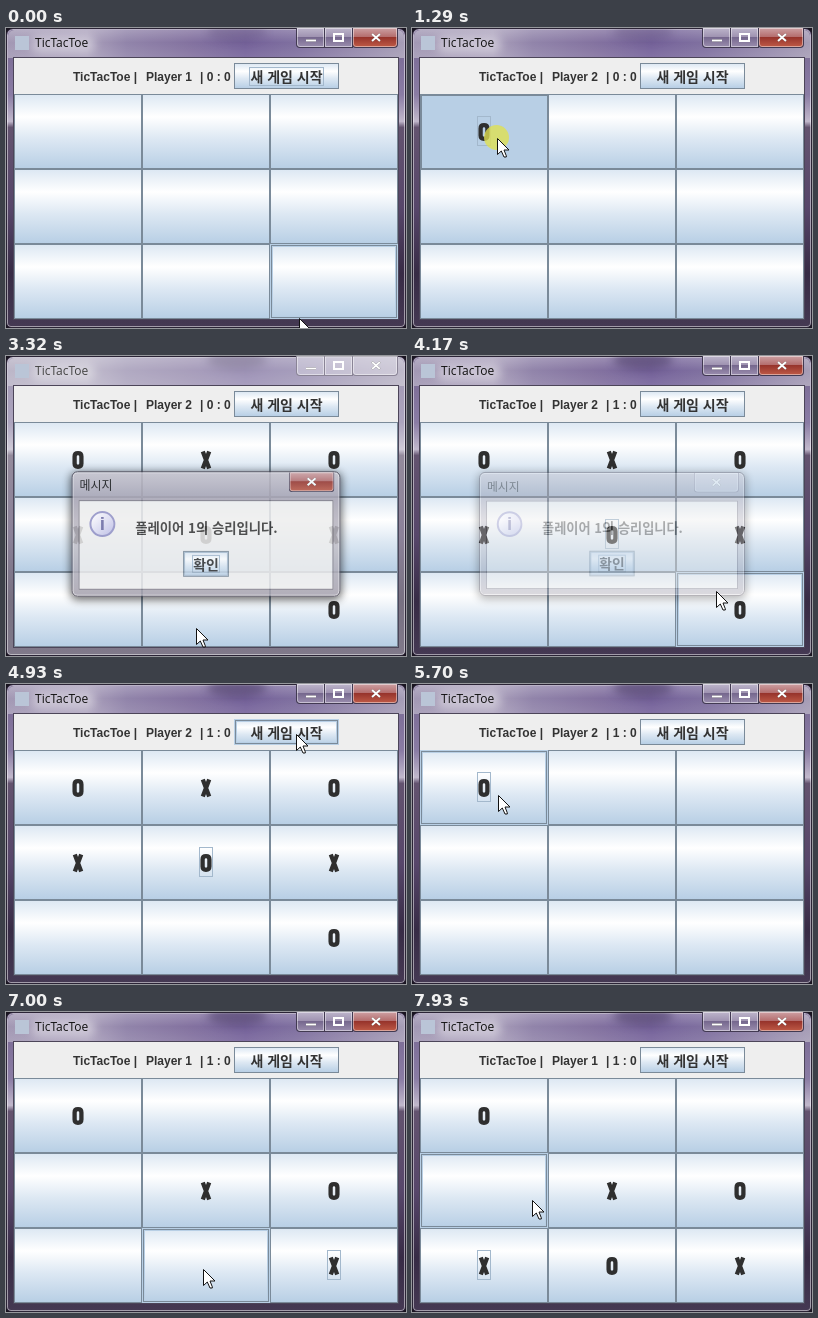
These frames come from a looping animation (400 by 300 pixels, 8 s). An HTML page:

```html
<!DOCTYPE html>
<html lang="ko">
<head>
<meta charset="utf-8">
<title>TicTacToe</title>
<style>
html, body { margin: 0; width: 100%; height: 100%; overflow: hidden; background: #18131f; }
body * { position: absolute; box-sizing: border-box; }
#stage { left: 0; top: 0; width: 400px; height: 300px; overflow: hidden; color: #333; }

/* glass frame */
#frame {
  inset: 0; border-radius: 7px 7px 5px 5px; border: 1px solid #2b2436; overflow: hidden;
  background: linear-gradient(#75658f, #8a7ca4 22%, #c1b8cc 31%, #63536f 33%, #57466a 60%, #372b45 82%, #453953);
  box-shadow: inset 0 0 0 1px rgba(255,255,255,.5);
}
#sky {
  left: 1px; top: 1px; width: 396px; height: 28px; border-radius: 6px 6px 0 0;
  background: linear-gradient(rgba(255,255,255,.2), rgba(255,255,255,0) 45%, rgba(255,255,255,.1)),
    linear-gradient(90deg, #a298b4, #aaa0bb 20%, #9184aa 30%, #8473a0 45%, #75629a 60%, #8071a0 74%, #a69db6);
}
#tree { left: 200px; top: -6px; width: 60px; height: 18px; border-radius: 50%; background: #4f406b; filter: blur(4px); opacity: .25; }
.late #tree { opacity: .6; }
#glow { left: 24px; top: 7px; width: 64px; height: 17px; border-radius: 8px; background: #fff; opacity: .4; filter: blur(5px); }
#icon { left: 9px; top: 8px; width: 14px; height: 14px; background: #bac5d7; }
.title { font: 12px/16px "Open Sans", "Noto Sans CJK KR", "Noto Sans CJK", sans-serif; color: #111; white-space: nowrap; }
.idle #frame::after { content: ""; position: absolute; inset: 0; background: rgba(232,234,236,.36); }
.idle > .title { color: #444; }

.cap { top: 0; height: 20px; border: 1px solid #423a52; border-top: 0;
  background: linear-gradient(#bdb5cb, #a094b2 45%, #76688e 50%, #9a8dae); box-shadow: inset 0 0 0 1px rgba(255,255,255,.45); }
.close { border-radius: 0 0 4px 4px; background: linear-gradient(#cda0a3, #b56f6f 45%, #97342c 50%, #bf5a46); }
.idle > .cap, .closing .close { background: rgba(225,222,232,.45); border-color: #8a8496; }
.cap svg { left: 0; top: 0; width: 100%; height: 100%; overflow: visible; }
.cap path, .cap rect { fill: none; stroke: #fff; stroke-width: 2; filter: drop-shadow(0 0 .6px #333); }

/* client area */
#client { left: 7px; top: 29px; width: 386px; height: 263px; background: #eee; border: 1px solid #4c4559; }
#board { left: 0; top: 0; }
.label { top: 41px; font: bold 12px/16px "Liberation Sans", Arial, sans-serif; white-space: nowrap; }
.btn {
  border: 1px solid #7a8a99;
  background: linear-gradient(#dde8f3, #fff 30%, #dde8f3 60%, #b8cfe5);
}
.hover { border-color: #b8cfe5; box-shadow: inset 0 0 0 1px #7a8a99, inset 0 0 0 2px #b8cfe5; }
.down { background: #b8cfe5; border-color: #7a8a99; box-shadow: inset 1px 1px #7a8a99; }
.cell { width: 128px; height: 75px; }
.cell svg { left: 57px; top: 28px; width: 12px; height: 18px; overflow: visible; }
.cell path { fill: none; stroke: #2f2f2f; stroke-width: 4.3; display: none; }
.o .ring, .x .cross { display: inline; }
.focus { border: 1px solid #a3b8cc; visibility: hidden; }
.on > .focus { visibility: visible; }
.cell .focus { left: 56px; top: 21px; width: 14px; height: 30px; }
.ko { font: bold 14px/18px "Noto Sans CJK KR", "Noto Sans CJK", "Noto Sans", sans-serif; white-space: nowrap; }
.mid { left: 0; right: 0; text-align: center; }
#fresh { left: 228px; top: 35px; width: 105px; height: 26px; }
#fresh .focus { left: 14px; top: 3px; width: 75px; height: 19px; }

/* message box */
#box {
  left: 65px; top: 115px; width: 270px; height: 126px; border-radius: 6px; border: 1px solid #3c3846;
  background: linear-gradient(#c5c2cc, #a9a5b4 22%, #c2c0c8 60%, #a5a1ae);
  box-shadow: inset 0 0 0 1px rgba(255,255,255,.6), 0 2px 9px 1px rgba(0,0,0,.7);
}
#pane { left: 6px; top: 28px; width: 256px; height: 90px; background: #eee; border: 1px solid #6f6b7a; }
#info { left: 17px; top: 39px; width: 26px; height: 26px; border-radius: 50%; border: 2px solid #8f8fc4;
  background: linear-gradient(135deg, #fff, #b9b9e4); color: #6666a0; text-align: center;
  font: bold 19px/21px "Liberation Sans", Arial, sans-serif; }
#ok { left: 111px; top: 79px; width: 46px; height: 26px; box-shadow: inset 0 0 0 1px #a9bccf; }
#ok .focus { left: 8px; top: 3px; width: 28px; height: 18px; visibility: visible; }
#spot { width: 25px; height: 25px; margin: -13px 0 0 -13px; border-radius: 50%; background: rgba(224,224,80,.78); }
#arrow { width: 13px; height: 20px; overflow: visible; }
</style>
</head>
<body>
<div id="stage">
  <div id="frame"><div id="sky"></div><div id="tree"></div><div id="glow"></div></div>
  <div id="icon"></div>
  <div class="title" style="left:29px;top:7px">TicTacToe</div>
  <div class="cap" style="left:290px;width:29px;border-radius:0 0 0 4px"><svg><path d="M9 12.5H19"/></svg></div>
  <div class="cap" style="left:318px;width:29px"><svg><rect x="9" y="6" width="9" height="7"/></svg></div>
  <div class="cap close" style="left:346px;width:46px"><svg><path d="M19 6l8 7m0-7l-8 7"/></svg></div>
  <div id="client"></div>
  <div class="label" style="left:67px">TicTacToe |</div>
  <div class="label" id="player" style="left:140px"></div>
  <div class="label" id="score" style="left:194px"></div>
  <div class="btn" id="fresh"><div class="ko mid" style="top:3px">새 게임 시작</div><div class="focus"></div></div>
  <div id="board"></div>
  <div id="box">
    <div class="title" style="left:7px;top:6px">메시지</div>
    <div class="cap close" style="left:217px;width:46px"><svg><path d="M18 6l8 7m0-7l-8 7"/></svg></div>
    <div id="pane"></div>
    <div id="info">i</div>
    <div class="ko" style="left:63px;top:46px;font-size:13.4px">플레이어 1의 승리입니다.</div>
    <div class="btn" id="ok"><div class="ko mid" style="top:3px">확인</div><div class="focus"></div></div>
  </div>
  <div id="spot"></div>
  <svg id="arrow"><path d="M.5 .5V16.5L4.3 13L7 19H9.3V17.8L7 12H12Z" fill="#fff" stroke="#111"/></svg>
</div>
<script>
const LOOP = 8000, START = 680, TICK = 77.05;
const SHOW = 3130, HIDE = 3990;
const COLS = [85, 197, 285], ROWS = [110, 172, 257];
const $ = id => document.getElementById(id);
const clamp = v => Math.max(0, Math.min(1, v));

// pointer stops and clicks, both in order of time
const stops = [], clicks = [];

function rest(x, y, from, to = from) {
  stops.push({ t: from, x, y }, { t: to, x, y });
}

function press(what, x, y, t, hold) {
  rest(x, y, t - hold, t + hold);
  clicks.push({ t, what });
}

// a steady beat of clicks on the cells named by the digits of order
function play(order, start, beat) {
  [...order].forEach((digit, i) =>
    press(+digit, COLS[digit % 3], ROWS[Math.floor(digit / 3)], start + i * beat, beat / 4));
}

rest(293, 290, 0, 603);
rest(COLS[0], ROWS[0], 1140);
play('0385214', 1290, 283);
rest(190, 272, 3300, 3545);
press('ok', 200, 208, 3920, 50);
rest(304, 235, 4147);
rest(320, 240, 4378);
press('fresh', 290, 50, 4930, 80);
rest(290, 50, 5160);
play('045876', 5585, 368);
rest(120, 197, 7690, 7715);
rest(120, 188, 7920, LOOP);

const cells = Array.from({ length: 9 }, (_, i) => {
  const cell = document.createElement('div');
  cell.style.left = 8 + i % 3 * 128 + 'px';
  cell.style.top = 66 + Math.floor(i / 3) * 75 + 'px';
  cell.innerHTML = '<svg><path class="ring" d="M2.6 5.5Q2.6 2.2 6 2.2T9.4 5.5V12.5Q9.4 15.8 6 15.8T2.6 12.5Z"/>' +
    '<path class="cross" d="M2.8 .5L9.2 17.5M9.2 .5L2.8 17.5"/></svg><div class="focus"></div>';
  $('board').append(cell);
  return cell;
});

function pointer(t) {
  const n = stops.findIndex(s => s.t > t);
  const a = stops[n - 1], b = stops[n];
  const k = (t - a.t) / (b.t - a.t), e = k * k * (3 - 2 * k);
  return [a.x + (b.x - a.x) * e, a.y + (b.y - a.y) * e].map(Math.round);
}

function targetAt(x, y) {
  if (x >= 228 && x < 333 && y >= 35 && y < 61) return 'fresh';
  if (x < 8 || x >= 392 || y < 66 || y >= 291) return null;
  return Math.floor((x - 8) / 128) + 3 * Math.floor((y - 66) / 75);
}

function gameAt(t) {
  const game = { marks: [], turn: 0, focus: 'fresh', last: { t: -LOOP } };
  for (const click of clicks.filter(c => c.t <= t)) {
    game.last = click;
    if (click.what === 'ok') continue;
    game.focus = click.what;
    if (click.what === 'fresh') {
      game.marks = [];
      game.turn = 0;
    } else game.marks[click.what] = 'ox'[game.turn++ % 2];
  }
  return game;
}

function draw(time) {
  // the screen refreshes in even ticks
  const t = time < START ? 0 : START + Math.floor((time - START + 8) / TICK) * TICK;
  const [x, y] = pointer(t);
  const { marks, turn, focus, last } = gameAt(t);
  const modal = t >= SHOW && t < HIDE;
  const over = modal ? null : targetAt(x, y);
  const fresh = t - last.t < 95;
  const state = id => (over === id ? ' hover' : '') +
    (fresh && last.what === id ? ' down' : '') + (!modal && focus === id ? ' on' : '');

  cells.forEach((cell, i) => cell.className = 'btn cell ' + (marks[i] || '') + state(i));
  $('fresh').className = 'btn' + state('fresh');
  $('ok').className = 'btn' + state('ok');
  $('player').textContent = 'Player ' + (turn % 2 + 1);
  $('score').textContent = (t < HIDE ? '| 0' : '| 1') + ' : 0';
  $('stage').className = (modal ? 'idle ' : '') + (t > 2980 ? 'late' : '');

  const fade = t < HIDE ? clamp((t - SHOW) / 200) : clamp(1 - (t - HIDE) / 260);
  $('box').className = t < HIDE ? '' : 'closing';
  $('box').style.opacity = fade;
  $('box').style.transform = `scale(${0.975 + 0.025 * fade})`;
  $('spot').style.opacity = fresh ? 1 : 0;
  for (const id of ['spot', 'arrow']) {
    $(id).style.left = x + 'px';
    $(id).style.top = y + 'px';
  }
}

const begin = performance.now();
function loop() {
  draw((performance.now() - begin) % LOOP);
  requestAnimationFrame(loop);
}
loop();
</script>
</body>
</html>
```
